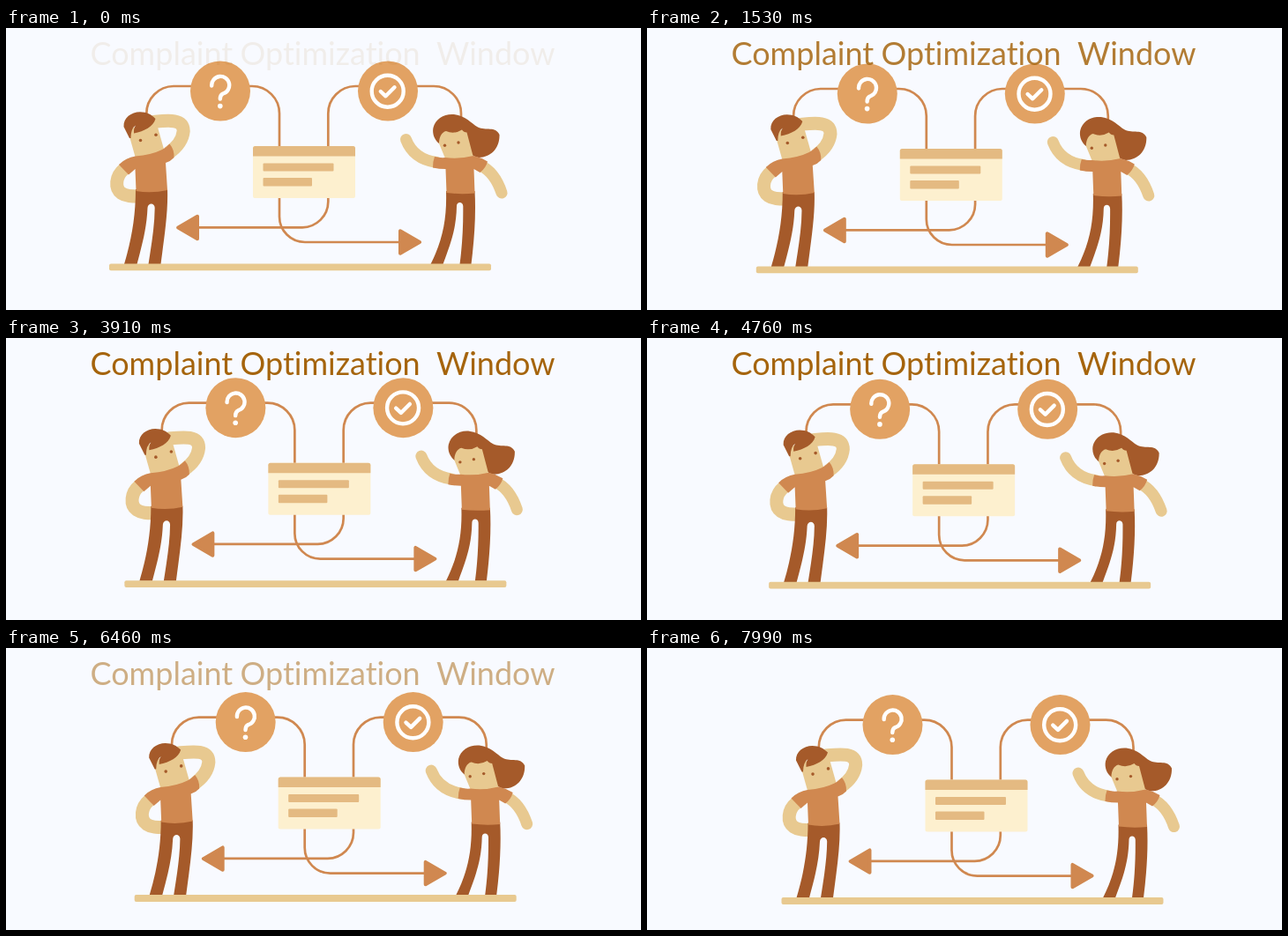
Animation of 720x320 px, one loop 9180 ms. Source, as an HTML page:

```html
<!DOCTYPE html>
<html lang="en">
<head>
<meta charset="utf-8">
<title>Complaint Optimization Window</title>
<style>
  html, body { margin: 0; width: 100%; height: 100%; overflow: hidden; background: #f8faff; }
  svg { display: block; width: 720px; height: 320px; }
  text { font: 36px Lato, sans-serif; font-variant-ligatures: none; fill: #a5640c; }
  .brown { fill: #a55a2a; }
  .rust { fill: #d08850; }
  .orange { fill: #e2a263; }
  .tan { fill: #e4ba82; }
  .skin { fill: #e8c990; }
  .cream { fill: #fdf0cf; }
  .wire { fill: none; stroke: #d08850; stroke-width: 2.7; }
  .arrow { fill: #d08850; stroke: #d08850; stroke-width: 4; stroke-linejoin: round; }
  .limb { fill: none; stroke: #e8c990; stroke-width: 15; }
  .slim { stroke-width: 13; stroke-linecap: round; }
  .icon { fill: none; stroke: #fff; stroke-width: 4.4; stroke-linecap: round; stroke-linejoin: round; }
</style>
</head>
<body>
<svg viewBox="0 0 720 320">
  <g id="scene">
    <!-- connections -->
    <path class="wire" d="M159.3 100V97A31 31 0 0 1 190 66H279A31 31 0 0 1 310 97V214A29 29 0 0 0 339 243H448"/>
    <path class="wire" d="M516 102V97A31 31 0 0 0 485 66H396A31 31 0 0 0 365.3 97V197A29.5 29.5 0 0 1 336 226.3H216"/>
    <path class="arrow" d="M195.2 226.5L217 213.8V239.2ZM469 243L447 230.3V255.7Z"/>

    <!-- badges -->
    <circle class="orange" cx="243" cy="71.5" r="34"/>
    <path class="icon" d="M233.2 65.5A10 10 0 1 1 246 74.5Q242.8 76 242.8 80.5"/>
    <circle cx="242.8" cy="88.6" r="2.8" fill="#fff"/>
    <circle class="orange" cx="433" cy="71.5" r="34"/>
    <circle class="icon" cx="432.7" cy="71.7" r="18"/>
    <path class="icon" d="M424.8 72L430.5 77.3L440.5 67.3"/>

    <!-- dialog -->
    <rect class="cream" x="280" y="134" width="116" height="59" rx="2"/>
    <path class="tan" d="M280 145.5V136.5Q280 134 282.5 134H393.5Q396 134 396 136.5V145.5Z"/>
    <rect class="tan" x="291.5" y="153.5" width="80" height="9" rx="1"/>
    <rect class="tan" x="291.5" y="170" width="55.5" height="9.5" rx="1"/>

    <!-- puzzled man -->
    <path class="limb" d="M166 106.5C182 105 201 102 201.2 117C200 129 193 136 184 142"/>
    <path class="limb" d="M134 160C124 168 123 182 131 187.5C136 191 143 191 150 191"/>
    <path class="skin" d="M138 116L147 148Q165 153 180 141L169 102Z"/>
    <path class="brown" d="M140 125L133.5 112C133 102 142 95.3 152 95.3C159 95.3 165 98 169.5 103C167 112 157 117 145 119.5Q144.5 114 147 110.5Q141.5 114 141.5 125Z"/>
    <circle class="brown" cx="152.5" cy="127.5" r="1.8"/>
    <circle class="brown" cx="170" cy="121.3" r="1.8"/>
    <path class="brown" d="M147 183H183C184 210 179 240 175.5 268H161.5C165 245 168.5 225 168.7 204C168.5 198 161 198 160.5 204C159.5 228 154 247 148.5 268H134C142 241 147 215 147 183Z"/>
    <path class="rust" d="M128 155Q136 147 146.5 145.5Q165 144 177 138Q182 135.5 185.5 131.5Q191 138 190.5 147Q187 151 181 153L183 184Q165 188 147.5 185L146.5 160L139 166.5Z"/>

    <!-- waving woman -->
    <path class="limb slim" d="M453.5 126.5C459 141 471 150 488 152.5"/>
    <path class="limb slim" d="M538 156C551 162 558 175 562 187"/>
    <path class="brown" d="M491 131C486 127 483 120 484.5 113C487 103 497 97 508 98C522 100 527 108 535 112.5C544 117 555 111 559.5 121C560 136 550 147 536 147Q529 146 524 140Z"/>
    <path class="skin" d="M491 131C491 124 494 118 499 117Q508 121 517 115.5Q519 118.5 522.5 118.5L530 147Q514 152 498 148Z"/>
    <circle class="brown" cx="497.5" cy="133.2" r="1.7"/>
    <circle class="brown" cx="513" cy="130" r="1.7"/>
    <path class="brown" d="M499 185H531.5C533 212 531 240 527.5 268H514.5C517.5 245 518.5 225 518.3 202C518 196.5 511 196.5 511 202C510.5 230 503 247 495.5 268H481.5C495 241 500 217 499 185Z"/>
    <path class="rust" d="M486 146Q492 147.5 498 147Q514 149 530 145Q539 147 546 151.5Q544 159 537.5 164L530.5 160L531.5 187.5Q515 189 499.5 187L498.5 160Q491 160 484 158.5Q484 151 486 146Z"/>

    <rect class="skin" x="117" y="267.5" width="433" height="7.8" rx="2"/>
  </g>

  <text id="title" y="42"><tspan x="95.5">Complaint</tspan><tspan x="265.5">Optimization</tspan><tspan x="488">Window</tspan></text>
</svg>

<script>
  const LOOP = 9180, STEP = 170, LAST = 47;
  const scene = document.getElementById("scene");
  const title = document.getElementById("title");
  const clamp = v => Math.max(0, Math.min(1, v));

  function draw() {
    const step = Math.min(LAST, Math.floor(performance.now() % LOOP / STEP));
    scene.setAttribute("transform", `translate(${step * 0.755} ${step * 0.332})`);
    const fadeIn = (step + 1) / 12, fadeOut = (42 - step) / 8;
    title.setAttribute("opacity", clamp(Math.min(fadeIn, fadeOut)));
    requestAnimationFrame(draw);
  }
  draw();
</script>
</body>
</html>
```
